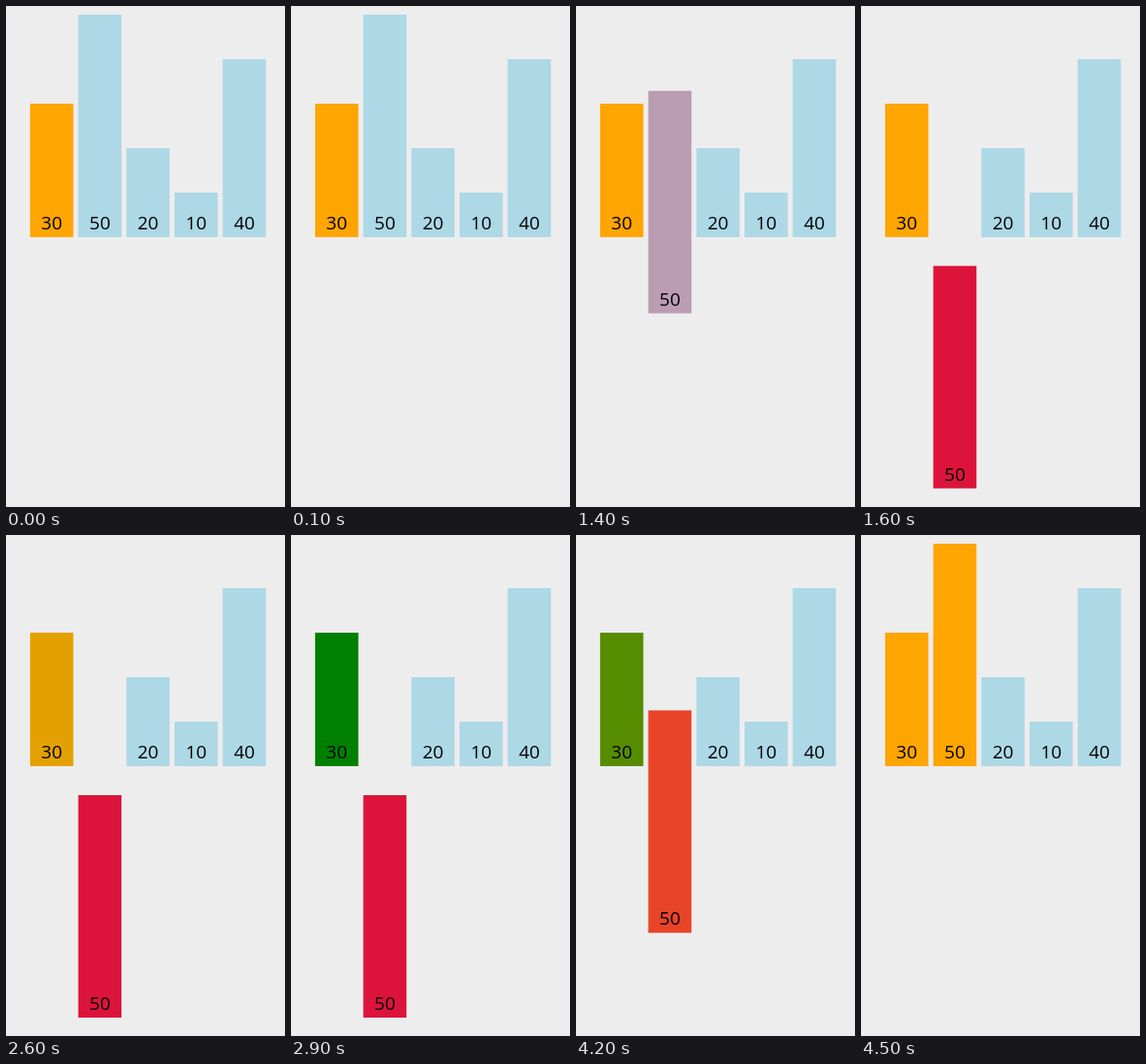
These frames come from a looping animation (288 by 518 pixels, 7 s). An HTML page with a canvas:

```html
<!DOCTYPE html>
<html lang="en">
<head>
<meta charset="utf-8">
<title>Insertion sort</title>
<style>
  html, body { margin: 0; width: 100%; height: 100%; overflow: hidden; background: #ededed; }
  canvas { display: block; width: 288px; height: 518px; }
</style>
</head>
<body>
<canvas id="stage"></canvas>
<script>
const WIDTH = 288, HEIGHT = 518, LOOP = 7000, STEP = 100, DURATION = 390;
const BASE = 239, UNIT = 4.6, PITCH = 49.7, BAR = 44.6, LEFT = 24.9, DROP = 260;
const VALUES = [30, 50, 20, 10, 40];
const BLUE = [173, 216, 230], ORANGE = [255, 165, 0];
const RED = [220, 20, 60], GREEN = [0, 128, 0];

const canvas = document.getElementById('stage');
const ctx = canvas.getContext('2d');
const scale = window.devicePixelRatio || 1;
canvas.width = WIDTH * scale;
canvas.height = HEIGHT * scale;
ctx.scale(scale, scale);

const cubicInOut = u => u < 0.5 ? 4 * u ** 3 : 1 - 4 * (1 - u) ** 3;
const progress = (t, start) =>
  cubicInOut(Math.min(1, Math.max(0, (t - start) / DURATION)));
const mix = (a, b, k) => a.map((v, i) => v + (b[i] - v) * k);

function drawBar(index, color, offset) {
  const value = VALUES[index];
  const x = LEFT + index * PITCH;
  ctx.fillStyle = `rgb(${color.map(Math.round).join(',')})`;
  ctx.fillRect(x, BASE - value * UNIT + offset, BAR, value * UNIT);
  ctx.fillStyle = '#000';
  ctx.fillText(value, x + BAR / 2, BASE - 8 + offset);
}

function draw(t) {
  const lift = progress(t, 1235);     // pick up the key
  const compare = progress(t, 2482);  // highlight its neighbour
  const settle = progress(t, 4029);   // put the key back

  ctx.fillStyle = '#ededed';
  ctx.fillRect(0, 0, WIDTH, HEIGHT);
  ctx.font = '19px "Open Sans", "Noto Sans", sans-serif';
  ctx.textAlign = 'center';

  const neighbour = mix(mix(ORANGE, GREEN, compare), ORANGE, settle);
  const key = mix(mix(BLUE, RED, lift), ORANGE, settle);
  VALUES.forEach((_, i) => {
    const color = i === 0 ? neighbour : i === 1 ? key : BLUE;
    drawBar(i, color, i === 1 ? DROP * (lift - settle) : 0);
  });
}

const begin = performance.now();
function tick() {
  const t = (performance.now() - begin) % LOOP;
  draw(Math.floor(t / STEP) * STEP);
  requestAnimationFrame(tick);
}
tick();
</script>
</body>
</html>
```
